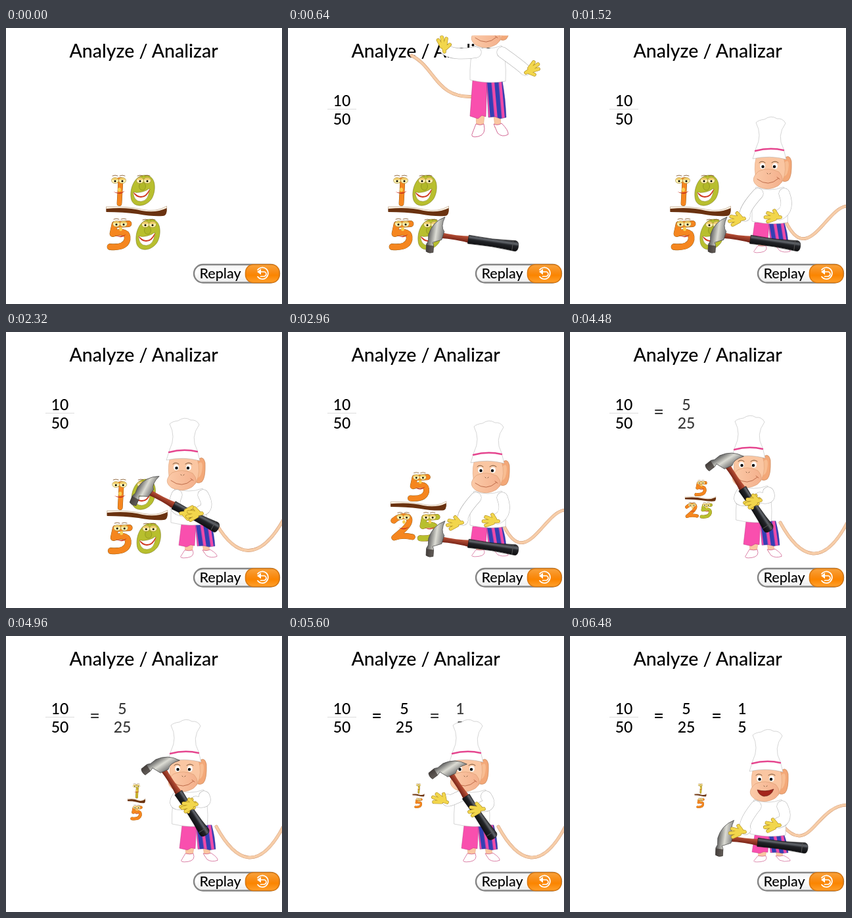
An HTML page that plays this animation: 420 px wide and 420 px high, repeating every 6560 ms.

```html
<!DOCTYPE html>
<html lang="en">
<head>
<meta charset="utf-8">
<title>Analyze / Analizar</title>
<style>
html, body { margin: 0; width: 100%; height: 100%; overflow: hidden; background: #fff; }
svg { display: block; width: 100%; height: 100%; }
text { font-family: Lato, "Open Sans", sans-serif; font-size: 23px; font-weight: 500; text-anchor: middle; fill: #000; }
.line { fill: none; stroke-linecap: round; stroke-linejoin: round; }
.cloth { fill: #fff; stroke: #aaa; stroke-width: .5; }
.skin { fill: #fac6a2; stroke: #d99a70; stroke-width: .5; }
</style>
</head>
<body>
<svg viewBox="0 0 420 420">
  <defs>
    <clipPath id="view"><rect y="11.5" width="420" height="409"/></clipPath>
    <linearGradient id="amber" x2="0" y2="1">
      <stop stop-color="#f9a23c"/><stop offset=".45" stop-color="#f98a10"/>
      <stop offset=".6" stop-color="#fb8500"/><stop offset="1" stop-color="#ffa02c"/>
    </linearGradient>
    <linearGradient id="pale" x2="0" y2="1">
      <stop stop-color="#f2f2f2"/><stop offset=".4" stop-color="#fff"/><stop offset="1" stop-color="#ececec"/>
    </linearGradient>
    <linearGradient id="muzzle"><stop stop-color="#fbcaa8"/><stop offset="1" stop-color="#f4b08c"/></linearGradient>
    <linearGradient id="steel"><stop stop-color="#555"/><stop offset=".5" stop-color="#dcdcd4"/><stop offset="1" stop-color="#777"/></linearGradient>
    <linearGradient id="wood" x2="0" y2="1"><stop stop-color="#c4583c"/><stop offset="1" stop-color="#6d1d12"/></linearGradient>
    <linearGradient id="grip" x2="0" y2="1">
      <stop stop-color="#1c1c1e"/><stop offset=".3" stop-color="#62666c"/><stop offset=".5" stop-color="#222428"/><stop offset="1" stop-color="#0c0c0e"/>
    </linearGradient>
    <pattern id="stripes" width="11" height="60" patternUnits="userSpaceOnUse" patternTransform="translate(303) rotate(-5)">
      <rect width="11" height="60" fill="#f04aa8"/><rect width="6.5" height="60" fill="#3340b4"/>
    </pattern>
  </defs>

  <text x="209.5" y="45" style="font-size:28.5px">Analyze / Analizar</text>

  <g id="button">
    <rect x="286" y="360" width="130" height="27.5" rx="13.7" fill="url(#pale)" stroke="#858585" stroke-width="2.4"/>
    <rect x="364.5" y="360" width="51.5" height="27.500" rx="12" fill="url(#amber)" stroke="#d87812" stroke-width="1.600"/>
    <text x="326" y="381" style="font-size:21.5px">Replay</text>
    <path class="line" d="M383 368A8.800 8.800 0 1 1 383 378.500M386 371h6.500a3.500 3.500 0 0 1 0 7h-5" stroke="#fff" stroke-width="1.700"/>
    <path d="M388 366.500v9l-6-4.500z" fill="#fff"/>
  </g>

  <g id="sum"></g>
  <g id="toons"></g>

  <g clip-path="url(#view)">
    <g id="body">
      <path id="tailEdge" class="line" stroke="#c98f68" stroke-width="4.8"/>
      <path id="tail" class="line" stroke="#f7cda8" stroke-width="4"/>
      <g id="legs">
        <path class="skin" d="M286 50L287 70L297 70L299 50zM313 50L315 70L324 70L323 50z"/>
        <path d="M281 -2L303 -2L301 53L295 51L289 56L277 52z" fill="#f94fae" stroke="#b02a78" stroke-width=".5"/>
        <path d="M302 -2L326 -2Q331 25 332 54L323 56L315 53L305 54z" fill="url(#stripes)" stroke="#5a3090" stroke-width=".5"/>
        <path d="M286 64Q293 67 298 64Q302 80 290 83Q276 86 281 77zM313 64Q319 67 325 63Q336 74 335 80Q326 85 319 78z" fill="#fff" stroke="#c8447c" stroke-width=".8"/>
      </g>
      <path id="jacket" class="cloth" d="M283 242Q304 250 325 242Q333 262 331 296Q306 301 277 294Q276 262 283 242z"/>
      <g id="head">
        <path d="M323 201Q334 189 337 203Q338 226 332 232Q322 238 320 224z" fill="#f3a878" stroke="#c07d50" stroke-width=".6"/>
        <path d="M326 205Q333 198 333 209Q332 224 326 226z" fill="#f8bd92"/>
        <path class="skin" d="M283 198Q304 189 325 197Q331 216 323 234Q304 250 284 234Q279 214 283 198z"/>
        <path d="M287 218Q302 211 318 219Q329 231 317 240Q302 249 286 241Q272 231 287 218z" fill="url(#muzzle)" stroke="#d99a70" stroke-width=".6"/>
        <ellipse cx="293" cy="210" rx="4" ry="4.500" fill="#fff"/><ellipse cx="312" cy="210" rx="4" ry="4.500" fill="#fff"/>
        <circle cx="293.500" cy="211" r="2.200"/><circle cx="311" cy="211" r="2.200"/>
        <path class="line" d="M288 205Q292 201 297 205M307 205Q312 201 317 205M300 221l1 1M305 221l-1 1" stroke="#5a3a20" stroke-width=".8"/>
        <path id="smile" class="line" d="M285 230Q302 243 317 229M315 227l4 3" stroke="#b05a38" stroke-width=".8"/>
        <path id="grin" d="M290 227Q302 231 315 226Q311 237 300 237Q292 235 290 227z" fill="#a3241c" stroke="#5a1a12" stroke-width=".6"/>
        <path class="cloth" d="M278 199L283 183Q293 163 283 144Q287 140 296 139Q306 132 315 138Q324 137 328 145Q314 164 325 184L329 200Q304 193 278 199z"/>
        <path class="line" d="M282 187Q304 181 325 186" stroke="#e5468f" stroke-width="2.4"/>
      </g>
      <g id="sleeves"></g>
    </g>
    <g id="hammer">
      <path d="M6 -4Q30 -2 52 -5L52 6Q30 3 6 5z" fill="url(#wood)"/>
      <path d="M49 -6Q85 -4 121 -8Q126 -7 126 0Q126 8 121 8Q85 5 49 7z" fill="url(#grip)" stroke="#111" stroke-width=".6"/>
      <path d="M117 -7v14" stroke="#555" stroke-width="1"/>
      <path d="M9 -28Q-9 -18 -12 2L-11 12L-13 17L-12 28Q-7 31 -1 28L-2 17L-4 13L9 7L11 -6Q4 -12 9 -28z" fill="url(#steel)" stroke="#444" stroke-width=".7"/>
      <path d="M-13 18h11.500l.5 10q-6 3-11 0z" fill="#3c3430" opacity=".75"/>
    </g>
    <g id="hands"></g>
  </g>
</svg>
<script>
const LOOP = 6560, TICK = 80;
const $ = id => document.getElementById(id);
const set = (el, o) => { for (const k in o) el.setAttribute(k, o[k]); };
const clamp = v => Math.max(0, Math.min(1, v));
const ramp = (t, a, b) => clamp((t - a) / (b - a));
const smooth = u => u * u * (3 - 2 * u);
const mix = (a, b, u) => a + (b - a) * u;

// Written fractions
const term = (id, x, top, bottom, sign) => `<g id="${id}" opacity="0">` +
  (sign ? `<text x="${sign}" y="131" style="font-size:27px">=</text>` : `<path d="M60 123.5h44" stroke="#ddd"/>`) +
  `<text x="${x}" y="118.5">${top}</text><text x="${x}" y="146.5">${bottom}</text></g>`;
$('sum').innerHTML = term('t1', 82, 10, 50) + term('t2', 177, 5, 25, 135) + term('t3', 262, 1, 5, 223);

// Digits with faces
const ORANGE = '#f5861f', OLIVE = '#b8bf2e';
const STROKES = {
  1: 'M11 8L17 7L15 43',
  2: 'M5 14Q16 4 29 8Q36 16 20 30L6 42Q20 37 36 41',
  5: 'M34 8L13 9L10 23Q34 16 32 32Q29 45 6 43'
};
const eyes = (x, y) => [-5.5, 5.5].map(d =>
  `<ellipse cx="${x + d}" cy="${y}" rx="5.5" ry="4.5" fill="#fff3b0" stroke="#8a6a20" stroke-width=".5"/>
   <path d="M${x + d - 5.5} ${y - 1}q5.5-7 11 0z" fill="#eecb68"/>
   <circle cx="${x + d}" cy="${y + 1}" r="1.5"/>
   <path class="line" d="M${x + d - 4} ${y - 7}q4-2 8 0" stroke="#7a4a18" stroke-width=".8"/>`).join('');

function digit(n, x, y, color) {
  let art;
  if (n) {
    const w = n === 1 ? 7 : 9, ex = n === 1 ? 14 : 21, d = STROKES[n];
    art = `<path class="line" d="${d}" stroke="#8a5a18" stroke-width="${w + .8}"/>
      <path class="line" d="${d}" stroke="${color}" stroke-width="${w}"/>${eyes(ex, 8)}
      <ellipse cx="${ex + 1}" cy="${n === 1 ? 22 : 16}" rx="2.5" ry="3" fill="#f7cf50"/>
      <path d="M${ex - 8} 25q9 4 17-1q-7 8-17 1z" fill="#c8301c"/>`;
  } else {
    art = `<path d="M24 1C42 1 41 26 34 37C25 50 6 51 3 37C0 22 8 1 24 1z" fill="${color}" stroke="#77791c" stroke-width=".6"/>
      <path d="M6 27Q20 29 31 21Q30 40 18 41Q7 41 6 27z" fill="#fff" stroke="#77791c" stroke-width=".5"/>
      <path d="M6 27Q18 36 32 22Q27 36 17 35Q9 34 6 27z" fill="#d03a22"/>
      <path d="M8 27Q18 33 30 23Q26 33 17 33Q11 32 8 27z" fill="#fff"/>
      <ellipse cx="20" cy="18" rx="5" ry="6" fill="#b1b828" stroke="#77791c" stroke-width=".5"/>${eyes(22, 9)}`;
  }
  return `<g transform="translate(${x} ${y})">${art}</g>`;
}
const bar = k => `<g transform="scale(${k} 1)">
  <path d="M-46 -7Q-14 -8 8 -3Q30 2 46 -8L46 0Q30 5 8 2Q-14 -2 -46 0z" fill="#fff6e8" stroke="#a08060" stroke-width=".5"/>
  <path d="M-46 -4Q-14 -7 8 -1Q30 3 46 -5Q47 7 40 7Q24 8 2 4Q-20 1 -46 1z" fill="#6a3210"/></g>`;
const toon = (id, k, ...list) => `<g id="${id}">${bar(k)}${list.map(a => digit(...a)).join('')}</g>`;
$('toons').innerHTML =
  toon('f10', 1, [1, -41, -55, ORANGE], [0, -11, -56, OLIVE], [5, -46, 11, ORANGE], [0, -3, 11, OLIVE]) +
  toon('f5', 1, [5, -19, -56, ORANGE], [2, -46, 10, ORANGE], [5, -3, 10, OLIVE]) +
  toon('f1', .6, [1, -14, -54, '#c9b52c'], [5, -20, 13, ORANGE]);

// Arms: outlined strokes, two layers each
const pair = (a, b, wa, wb) => `<path class="line" stroke="${a}" stroke-width="${wa}"/><path class="line" stroke="${b}" stroke-width="${wb}"/>`;
$('sleeves').innerHTML = pair('#aaa', '#fff', 17, 16) + pair('#aaa', '#fff', 17, 16);
const GLOVE = 'M0 0L11 0M9 -3L21 -7M10 0L25 0M9 3L21 7M5 3L10 11';
const glove = `<g>${pair('#a8861c', '#f2d64c', 6.2, 5)}</g>`;
$('hands').innerHTML = glove + glove;
$('hands').querySelectorAll('path').forEach(p => set(p, { d: GLOVE }));
const sleeves = $('sleeves').children, hands = $('hands').children;

// body x y, leg length, leg shift | left hand x y angle | right hand x y angle | hammer x y angle | tail curve
const POSES = {
  fall:   [0, -215, 84, 0,  238, 251, -100, 362, 283, -35,  226, 314, 8.4,  286, 319, 225, 325, 225, 275, 188, 257],
  land:   [0, 4, 40, 0,     246, 272, 190,  358, 270, -20,  226, 314, 8.4,  318, 296, 330, 350, 370, 400, 405, 370],
  rest:   [0, 0, 45, 0,     265, 290, 170,  320, 288, 180,  226, 314, 8.4,  328, 294, 362, 365, 390, 272, 422, 271],
  hold:   [-32, -8, 55, 19, 298, 268, -15,  322, 264, 165,  236, 197, 57,   352, 298, 382, 353, 417, 368, 454, 298],
  strike: [-34, -4, 51, 20, 300, 280, -10,  332, 280, 168,  212, 240, 28,   354, 296, 384, 347, 419, 355, 456, 290],
  show:   [-32, -8, 55, 19, 274, 261, 200,  330, 271, 168,  244, 203, 56.5, 352, 298, 382, 353, 417, 368, 454, 298],
  done:   [-5, 7, 40, 5,    271, 291, 175,  324, 281, 172,  237, 307, 7.4,  330, 283, 370, 328, 380, 251, 427, 250]
};
// time, pose, drop
const STEPS = [
  [0, 'fall', -352], [960, 'fall', 176], [1040, 'fall', 176], [1120, 'fall', 157], [1280, 'land'], [1440, 'rest'],
  [1600, 'rest'], [1920, 'hold'], [2160, 'hold'], [2320, 'strike'], [2480, 'strike'], [2640, 'hold'], [2880, 'rest'],
  [3680, 'rest'], [4160, 'hold'], [4560, 'hold'], [4720, 'strike'], [4800, 'strike'], [4960, 'hold'],
  [5200, 'hold'], [5520, 'show'], [5760, 'show'], [6400, 'done'], [LOOP, 'done']
];

function poseAt(t) {
  const i = STEPS.findIndex(s => s[0] > t);
  const [t0, a, da = 0] = STEPS[i - 1], [t1, b, db = 0] = STEPS[i];
  let u = ramp(t, t0, t1);
  if (a !== b) u = smooth(u);
  const p = POSES[a].map((v, k) => mix(v, POSES[b][k], u));
  p[1] += mix(da, db, u);
  return p;
}

function drawMonkey(t) {
  const [bx, by, leg, lx, ax, ay, aa, cx, cy, ca, hx, hy, ha, ...tail] = poseAt(t);
  const lean = lx * .4;
  set($('body'), { transform: `translate(${bx} ${by})` });
  set($('jacket'), { transform: `translate(${lean} 0)` });
  set($('legs'), { transform: `translate(${lx} 297) scale(1 ${leg / 84})` });
  const d = `M${tail.slice(0, 2)}C${tail.slice(2)}`;
  set($('tail'), { d });
  set($('tailEdge'), { d });
  const arm = (i, shoulder, x, y, angle, side) => {
    const sx = shoulder + lean;
    const curve = `M${sx} 252Q${(sx + x) / 2 + side * 12} ${(252 + y) / 2 + 6} ${x - side} ${y - 4}`;
    set(sleeves[2 * i], { d: curve });
    set(sleeves[2 * i + 1], { d: curve });
    set(hands[i], { transform: `translate(${x + bx} ${y + by}) rotate(${angle}) scale(.9)` });
  };
  arm(0, 286, ax, ay, aa, -1);
  arm(1, 326, cx, cy, ca, 1);
  const q = 1 - smooth(ramp(t, 0, 480));
  set($('hammer'), { transform: `translate(${hx + 70 * q} ${hy + 50 * q}) rotate(${ha})`, opacity: 1 - q });
  const happy = t >= 6000;
  set($('grin'), { opacity: +happy });
  set($('smile'), { opacity: +!happy });
}

function drawToons(t) {
  const place = (id, on, y, s, dx = 0) => set($(id), {
    transform: `translate(${198.5 + dx} ${y}) scale(${s})`, visibility: on ? 'visible' : 'hidden'
  });
  const shake = (a, b) => t >= a && t < b ? Math.sin(t / TICK * 2.2) * 1.5 : 0;
  const shrink = smooth(ramp(t, 3040, 3760)), last = smooth(ramp(t, 4800, 5520));
  place('f10', t < 2400, 279, 1, shake(1600, 2400));
  place('f5', t >= 2400 && t < 4800, mix(265, 254, shrink), mix(.92, .51, shrink), shake(2400, 2880) + shake(4640, 4800));
  place('f1', t >= 4800, mix(252, 242, last), mix(.51, .325, last));
}

function draw(t) {
  set($('t1'), { opacity: ramp(t, 0, 560) });
  set($('t2'), { opacity: t < 5120 ? .78 * ramp(t, 3040, 3760) : 1 });
  set($('t3'), { opacity: t < 5760 ? ramp(t, 5040, 5760) : 1 });
  drawToons(t);
  drawMonkey(t);
}

const start = performance.now();
function frame() {
  const t = (performance.now() - start) % LOOP;
  draw(Math.floor(t / TICK) * TICK);
  requestAnimationFrame(frame);
}
frame();
</script>
</body>
</html>
```
